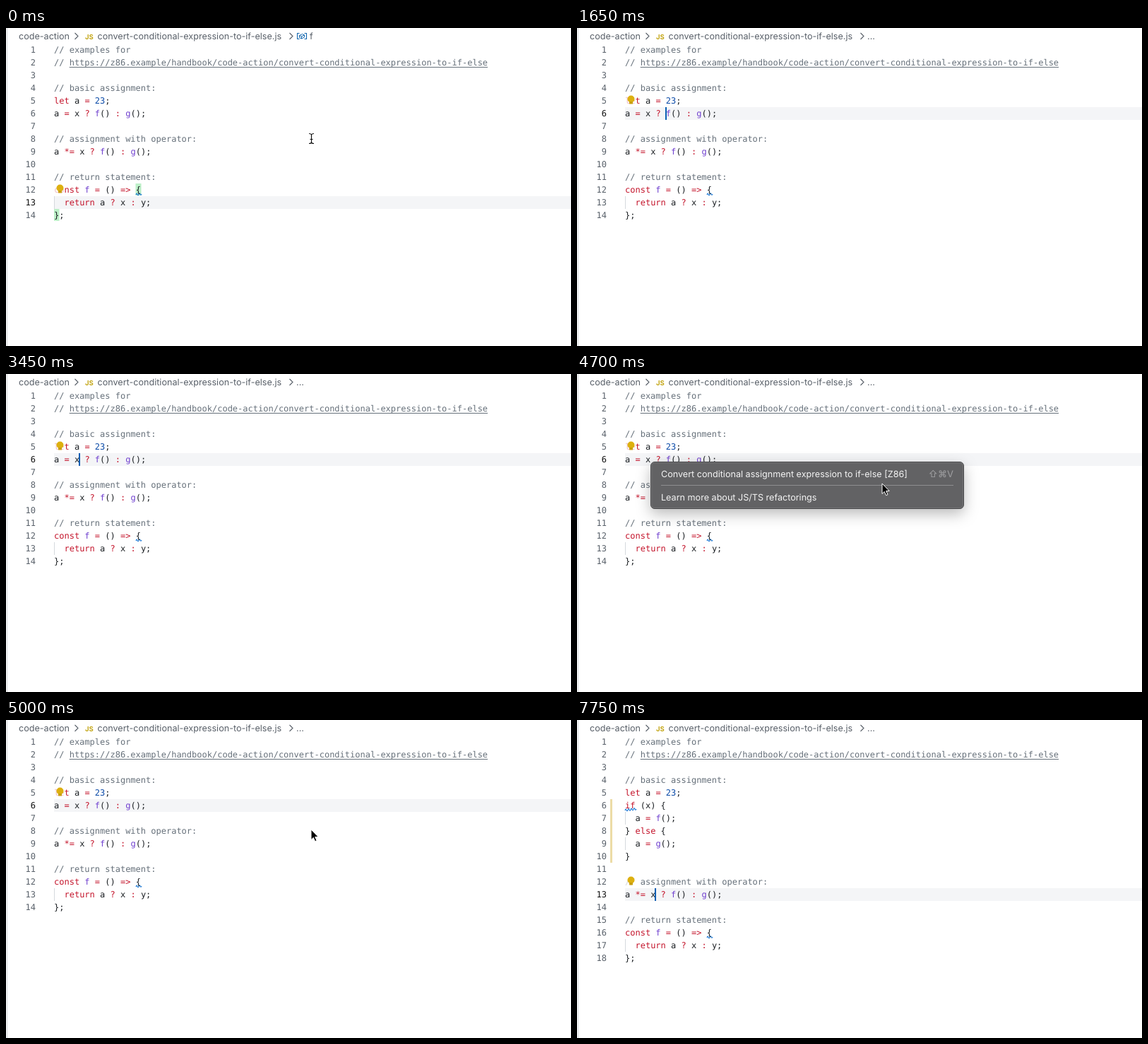
These frames come from a looping animation (800x450 px, 8000 ms). An HTML page:

```html
<!DOCTYPE html>
<html lang="en">
<head>
<meta charset="utf-8">
<title>Code action</title>
<style>
html, body { margin: 0; width: 100%; height: 100%; overflow: hidden; background: #fff; }
svg { display: block; width: 800px; height: 450px; }
text { white-space: pre; text-rendering: geometricPrecision; }
.code { font: 12px "DejaVu Sans Mono", monospace; fill: #1c2024; }
.ui { font: 12.6px Inter, sans-serif; fill: #596069; }
.comment { fill: #66707a; }
.keyword { fill: #c4142b; }
.number { fill: #0a4aa8; }
.func { fill: #7040cf; }
.menu text { fill: #f4f4f4; }
.menu .keys { font: 13px Inter, "DejaVu Sans", sans-serif; fill: #a0a0a2; text-anchor: end; }
.menu .box { fill: #626264; stroke: #454547; filter: drop-shadow(0 7px 10px rgba(0, 0, 0, .27)); }
</style>
</head>
<body>
<svg id="stage" viewBox="0 0 800 450"></svg>
<script>
const LOOP = 8000, ROW = 18, LEFT = 68, CHAR = 7.224, KEY = 133;
const OPEN = 4600, CLOSE = 4850, FADE = 100, EDIT = 5150, LINT = 5250;
const FIRST_KEY = 367, SETTLE = 1470, DOWN_KEY = 5900, SETTLE_2 = 7020;

const before = `// examples for
// https://z86.example/handbook/code-action/convert-conditional-expression-to-if-else

// basic assignment:
let a = 23;
a = x ? f() : g();

// assignment with operator:
a *= x ? f() : g();

// return statement:
const f = () => {
  return a ? x : y;
};`.split('\n');
const after = [...before];
after.splice(5, 1, 'if (x) {', '  a = f();', '} else {', '  a = g();', '}');

// Caret positions: time, line, column
const moves = [[-500, 13, 9]];
for (let k = 0; k < 7; k++) moves.push([FIRST_KEY + KEY * k, 12 - k, 9]);
for (let k = 0; k < 4; k++) moves.push([1650 + KEY * k, 6, 8 - k]);
moves.push([EDIT, 6, 6]);
for (let k = 0; k < 7; k++) moves.push([DOWN_KEY + KEY * k, 7 + k, 6]);

const rowY = line => 22 + ROW * (line - 1);
const colX = col => LEFT + col * CHAR;
const rect = (x, y, w, h, fill) => `<rect x="${x}" y="${y}" width="${w}" height="${h}" fill="${fill}"/>`;
const text = (x, y, s, cls, extra = '') => `<text x="${x}" y="${y}" class="${cls}" ${extra}>${s}</text>`;
const path = (d, stroke, width = 1, fill = 'none') =>
  `<path d="${d}" stroke="${stroke}" stroke-width="${width}" fill="${fill}"/>`;
const span = (cls, s) => `<tspan class="${cls}">${s}</tspan>`;

function paint(code) {
  if (code.startsWith('//')) return span('comment', code);
  return code.replace(/\b(let|const|return|if|else)\b|[?:=*]+>?|\d+|\b[fg]\b/g, s =>
    span(/^\d/.test(s) ? 'number' : /^[fg]$/.test(s) ? 'func' : 'keyword', s));
}

function squiggle(x, line, width) {
  let d = `M${x} ${rowY(line) + 16}`;
  for (let i = 0; i < width / 4; i++) d += 'q1 -3 2 -.5t2 0';
  return path(d, '#1a78d6', 1.1);
}

function breadcrumb(inFunction) {
  const chevron = x => path(`M${x} 7l4.5 4.5l-4.5 4.5`, '#596069', 1.1);
  const s = text(18, 16, 'code-action', 'ui') + chevron(97.5) +
    text(112, 15.5, 'JS', 'ui', 'style="font-size:9.5px;font-weight:700;fill:#c3a616"') +
    text(129.5, 16, 'convert-conditional-expression-to-if-else.js', 'ui') + chevron(401.5);
  if (!inFunction) return s + text(411, 16, '...', 'ui');
  return s + path('M415.5 7.5h-3v8h3M422.5 7.5h3v8h-3', '#1468b0', 1.1) +
    path('M415.5 10.5l4 -2l3 1.5v3l-4 2l-3 -1.5zl3 1.5l4 -2m-4 2v3', '#1468b0') +
    text(430, 16, 'f', 'ui');
}

function bulb(line) {
  const y = rowY(line);
  return rect(LEFT, y + 1, 14, 16, 'rgba(255,255,255,.72)') +
    `<circle cx="76.5" cy="${y + 6.5}" r="5" fill="#ddb010"/>` +
    rect(74, y + 10, 5, 3.5, '#c99f10');
}

function menu(opacity) {
  return `<g class="menu" opacity="${opacity}">
    <rect class="box" x="104.5" y="124.5" width="443" height="66" rx="5.5"/>
    <rect x="105.5" y="125.5" width="441" height="64" rx="4.5" fill="none" stroke="#747476"/>
    ${rect(119, 157, 414, 1, '#8e8e90')}
    ${text(119, 146, 'Convert conditional assignment expression to if-else [Z86]', 'ui')}
    ${text(533, 146, '⇧⌘V', 'keys')}
    ${text(119, 179, 'Learn more about JS/TS refactorings', 'ui')}</g>`;
}

function beam() {
  const d = 'M429 149.5q3.5 0 3.5 2q0 -2 3.5 -2M432.5 151v11M429 163.5q3.5 0 3.5 -2q0 2 3.5 2M430.5 157.5h4';
  return path(d, '#fff', 3) + path(d, '#111', 1.2);
}

const arrow = () => path('M432 155v14.5l3.3 -3.1l2.3 5.3l2.4 -1l-2.3 -5.2h4.5z', '#fff', 1, '#000');

function scene(t) {
  const edited = t >= EDIT;
  const lines = edited ? after : before;
  const shift = edited ? 4 : 0;
  const [since, active, wanted] = moves.filter(m => m[0] <= t).pop();
  let s = rect(1, 0, 1, 450, '#d6d8da') + breadcrumb(t < SETTLE) +
    rect(LEFT, rowY(active), 800 - LEFT, ROW, '#f4f5f7');

  if (t < FIRST_KEY) s += rect(183.5, rowY(12), 8, 17, '#bdf0c8') + rect(LEFT, rowY(14), 7.5, 17, '#bdf0c8');
  if (t >= LINT) s += rect(47, rowY(6), 3, ROW * 5, '#ecdca6') + squiggle(LEFT, 6, 14);
  s += squiggle(184, 12 + shift, 7);

  lines.forEach((code, i) => {
    const y = rowY(i + 1) + 13;
    s += text(42, y, i + 1, 'code', `text-anchor="end" style="fill:${i + 1 === active ? '#111' : '#59616a'}"`);
    if (code.startsWith('  ')) s += rect(LEFT, rowY(i + 1), 1, ROW, '#d5d9dd');
    s += text(LEFT, y, paint(code), 'code');
  });
  s += rect(colX(3), 55, (lines[1].length - 3) * CHAR, 1, '#66707a');
  s += bulb(t < SETTLE || t >= SETTLE_2 ? 12 : 5);

  const focused = t < OPEN || edited;
  if (focused && (t - since) % 1000 < 500) {
    const col = Math.min(wanted, lines[active - 1].length);
    s += rect(Math.round(colX(col)) - 1, rowY(active), 2, ROW, '#0a5fb4');
  }
  if (t >= OPEN && t < CLOSE + FADE) s += menu(Math.min(1, 1 - (t - CLOSE) / FADE));
  if (t < FIRST_KEY || (edited && t < DOWN_KEY)) s += beam();
  else if (!focused) s += arrow();
  return s;
}

const stage = document.getElementById('stage');
let shown = '';
function frame() {
  const next = scene(performance.now() % LOOP);
  if (next !== shown) stage.innerHTML = shown = next;
  requestAnimationFrame(frame);
}
frame();
</script>
</body>
</html>
```
